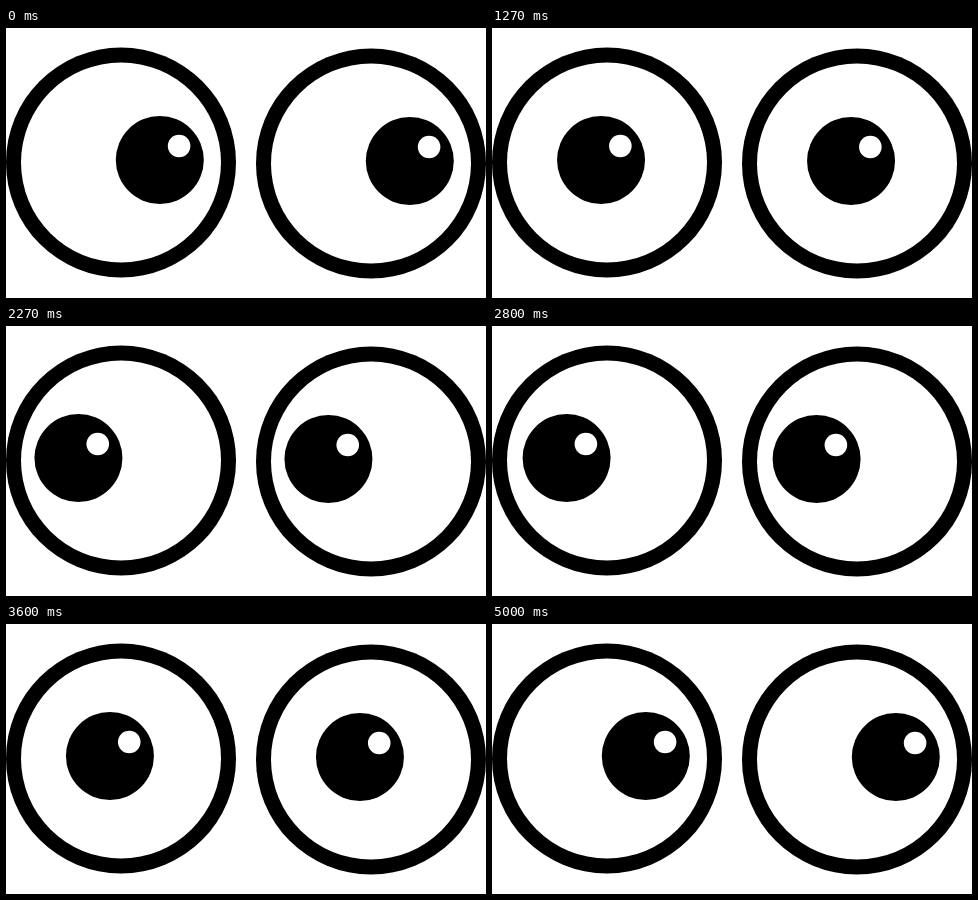
Recreate the animation shown at these times as an HTML page with a canvas. Size 480 px wide and 270 px high, loop 5070 ms.

```html
<!DOCTYPE html>
<html lang="en">
<head>
<meta charset="utf-8">
<title>Looking eyes</title>
<style>
  html, body { margin: 0; width: 100%; height: 100%; overflow: hidden; background: #fff; }
  canvas { display: block; }
</style>
</head>
<body>
<canvas id="stage" width="480" height="270"></canvas>
<script>
const ctx = document.getElementById('stage').getContext('2d');
const LOOP = 5070;
const STEP = 1000 / 15;
const TURN = 40;
const RIGHTMOST = 153.8;

function disc(x, y, r, color) {
  ctx.fillStyle = color;
  ctx.beginPath();
  ctx.arc(x, y, r, 0, Math.PI * 2);
  ctx.fill();
}

// Pupil centre of the left eye: steady sweep left, then back, resting at the right
function pupilX(step) {
  const x = step < TURN
    ? 155.4 - 2.44 * step
    : 69.7 + 2.445 * (step - TURN);
  return Math.min(x, RIGHTMOST);
}

function eye(dx, dy, px) {
  disc(115 + dx, 134.5 + dy, 115, '#000');
  disc(115 + dx, 134.5 + dy, 100, '#fff');
  disc(px + dx, 132 + dy, 44, '#000');
  disc(px + 19.3 + dx, 118 + dy, 11.3, '#fff');
}

function draw(time) {
  const step = Math.min(75, Math.floor((time % LOOP + 3.4) / STEP));
  const px = pupilX(step);
  ctx.fillStyle = '#fff';
  ctx.fillRect(0, 0, 480, 270);
  eye(0, 0, px);
  eye(250, 1, px);
}

let start = null;
function tick(now) {
  if (start === null) start = now;
  draw(now - start);
  requestAnimationFrame(tick);
}
draw(0);
requestAnimationFrame(tick);
</script>
</body>
</html>
```
